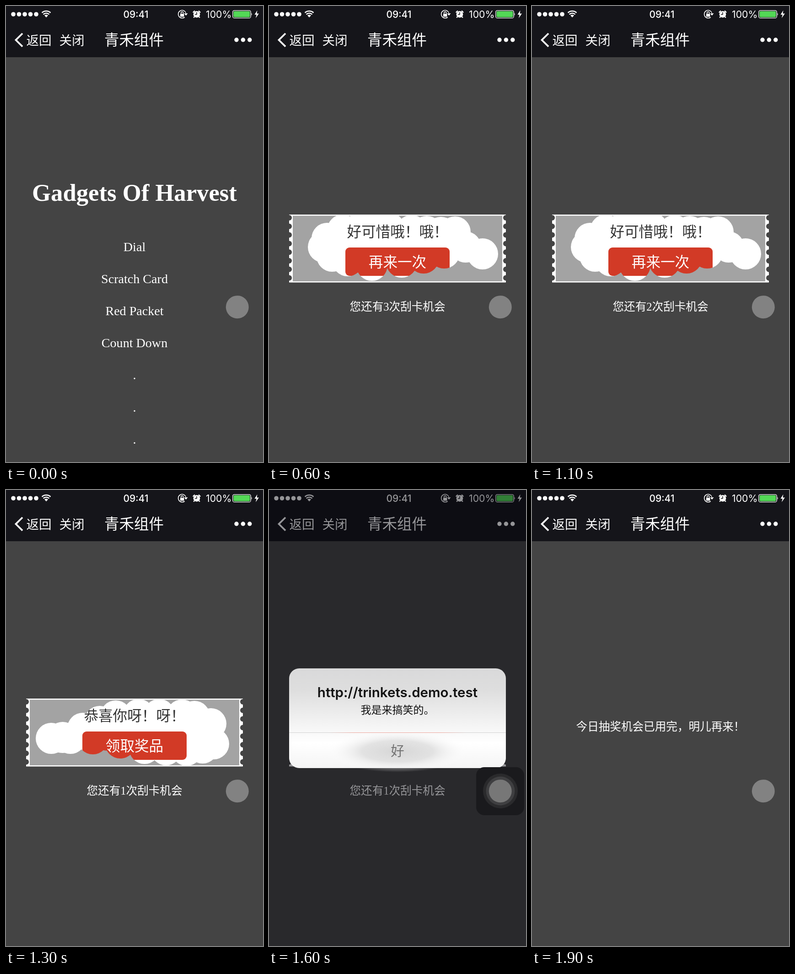
Recreate the animation shown at these times as an HTML page. Size 562 by 997 pixels, loop 2 s.

```html
<!DOCTYPE html>
<html lang="zh-CN">
<head>
<meta charset="utf-8">
<style>
html, body { margin: 0; width: 100%; height: 100%; overflow: hidden; background: #444; }
svg { display: block; width: 100vw; height: 100vh; }
text { fill: #fff; font-family: "Liberation Serif", "Noto Sans CJK SC", "Noto Sans CJK", serif; }
.ui { font-family: Inter, "Noto Sans CJK SC", "Noto Sans CJK", sans-serif; }
.mid { text-anchor: middle; }
.line { fill: none; stroke: #fff; }
</style>
</head>
<body>
<svg viewBox="0 0 562 997" preserveAspectRatio="none">
  <defs>
    <mask id="scratch" maskUnits="userSpaceOnUse" x="0" y="400" width="562" height="260">
      <rect y="400" width="562" height="260" fill="#fff"/>
      <path id="rubbed" fill="none" stroke="#000" stroke-width="68" stroke-linecap="round"/>
    </mask>
    <linearGradient id="glass" x2="0" y2="1">
      <stop stop-color="#d9d9da"/><stop offset=".22" stop-color="#dedede"/>
      <stop offset=".55" stop-color="#f3f3f3"/><stop offset=".75" stop-color="#fff"/>
      <stop offset="1" stop-color="#f4f4f4"/>
    </linearGradient>
    <radialGradient id="shade">
      <stop stop-color="#d6d6d6"/><stop offset=".5" stop-color="#dcdcdc" stop-opacity=".8"/>
      <stop offset="1" stop-color="#fff" stop-opacity="0"/>
    </radialGradient>
    <linearGradient id="divider">
      <stop offset=".18" stop-color="#d2d2d2"/><stop offset=".3" stop-color="#eda79d"/>
      <stop offset=".7" stop-color="#eda79d"/><stop offset=".82" stop-color="#d2d2d2"/>
    </linearGradient>
    <filter id="soft"><feGaussianBlur stdDeviation=".9"/></filter>
  </defs>

  <rect width="562" height="997" fill="#444"/>

  <g id="home" class="mid">
    <text x="281" y="426" font-size="52.7" font-weight="700">Gadgets Of Harvest</text>
    <g id="menu" font-size="28.1"></g>
  </g>

  <g id="card">
    <rect x="44" y="456" width="474" height="148.5" fill="#fff"/>
    <g id="notches" fill="#444"></g>
    <text id="message" class="mid" x="281" y="505" font-size="31.6" style="fill:#333"></text>
    <rect x="167" y="528" width="228" height="62" rx="9" fill="#d23a26"/>
    <text id="action" class="mid" x="281" y="571" font-size="31.6"></text>
    <g mask="url(#scratch)">
      <rect x="52" y="458.5" width="458" height="143.5" fill="#a3a3a3"/>
      <text class="ui mid" x="281" y="546" font-size="52" font-weight="700" style="fill:#595959" filter="url(#soft)">刮一刮</text>
    </g>
    <text id="chances" class="mid" x="281" y="666" font-size="24.6"></text>
  </g>

  <text id="finished" class="mid" x="281" y="525.5" font-size="24.6">今日抽奖机会已用完，明儿再来！</text>

  <rect width="562" height="112" fill="#15151a"/>
  <g fill="#fff">
    <g id="signal"></g>
    <path d="M88 25l-4-4.4a6 6 0 0 1 8 0z"/>
    <path class="line" stroke-width="2.6" d="M81.6 18.4a9.2 9.2 0 0 1 12.8 0M78.6 14.7a13.6 13.6 0 0 1 18.8 0"/>
    <text class="ui mid" x="284" y="25.7" font-size="21" font-weight="500">09:41</text>

    <path class="line" stroke-width="1.7" d="M393.3 15a8.6 8.6 0 1 0-2.6 9.5"/>
    <path d="M389.5 16h8l-4 5z"/>
    <rect x="381" y="17" width="8.4" height="6.4" rx="1"/>
    <path class="line" stroke-width="1.5" d="M382.8 17v-2a2.4 2.4 0 0 1 4.8 0v2"/>

    <circle cx="417" cy="18.2" r="7.3"/>
    <path class="line" stroke-width="2.4" d="M409 14.5a9 9 0 0 1 4-4M425 14.5a9 9 0 0 0-4-4M412 23.5l-1.8 2M422 23.5l1.8 2"/>
    <path class="line" stroke-width="1.5" style="stroke:#15151a" d="M417 13.5v5h-4"/>

    <text class="ui" x="437" y="25.8" font-size="21.3">100%</text>
    <rect class="line" x="495.8" y="9.8" width="39.4" height="16.6" rx="3.5" stroke-width="1.3"/>
    <rect x="497.6" y="11.6" width="35.8" height="13" rx="2" fill="#53d856"/>
    <path d="M536.6 15q2.4 3 0 6zM549.5 9.5l-6 9.5h4.3l-1.8 7.5 7-10h-4.5z"/>

    <path class="line" stroke-width="3.8" d="M36 60L21.5 74.3 36 88.6"/>
    <g class="ui" font-size="27.5">
      <text class="ui" x="44.5" y="84.5">返回</text>
      <text class="ui" x="116.5" y="84.5">关闭</text>
    </g>
    <text class="ui mid" x="280" y="86" font-size="32.5" font-weight="500">青禾组件</text>
    <g id="more"></g>
  </g>

  <g id="alert">
    <rect width="562" height="997" fill="#04040a" opacity=".42"/>
    <rect x="44" y="390" width="474" height="218" rx="22" fill="url(#glass)"/>
    <ellipse cx="281" cy="571" rx="155" ry="46" fill="url(#shade)"/>
    <path d="M44 530h474v1H44z" fill="url(#divider)"/>
    <g class="mid">
      <text class="ui" x="281" y="453" font-size="29.5" font-weight="600" style="fill:#111">http://trinkets.demo.test</text>
      <text class="ui" x="281" y="489" font-size="23" style="fill:#111">我是来搞笑的。</text>
      <text class="ui" x="281" y="580.5" font-size="29.5" style="fill:#747474">好</text>
    </g>
    <rect x="453" y="606" width="105" height="105" rx="18" fill="#1a1a1d"/>
    <circle cx="506" cy="658" r="38" fill="#2a2a2c"/>
    <circle cx="506" cy="658" r="31.5" fill="#3f3f41"/>
  </g>
  <circle id="touch" cx="505.8" cy="658.2" r="25"/>
</svg>
<script>
const $ = id => document.getElementById(id);
const repeat = (n, make) => Array.from({ length: n }, (_, i) => make(i)).join('');
const circle = (x, y, r) => `<circle cx="${x}" cy="${y}" r="${r}"/>`;

$('signal').innerHTML = repeat(5, i => circle(16 + 12.5 * i, 18, 4.8));
$('more').innerHTML = repeat(3, i => circle(504 + 14.4 * i, 74, 4.7));
$('notches').innerHTML = repeat(8, i => circle(44, 463 + 18.8 * i, 6) + circle(518, 463 + 18.8 * i, 6));
const items = ['Dial', 'Scratch Card', 'Red Packet', 'Count Down', '.', '.', '.'];
$('menu').innerHTML = repeat(7, i => `<text x="281" y="${535.5 + 70.2 * i}">${items[i]}</text>`);

// Finger positions, in the order they are rubbed
const loseRub = [
  [119, 527], [127, 508], [138, 547], [161, 490], [172, 557], [165, 525], [200, 485],
  [200, 525], [225, 567], [235, 485], [250, 525], [263, 486], [290, 560], [300, 525],
  [312, 491], [338, 551], [345, 493], [350, 522], [376, 495], [383, 540], [407, 494],
  [430, 527], [467, 542]
];
const winRub = [
  [99, 543], [124, 541], [141, 543], [168, 521], [190, 544], [205, 506], [222, 536],
  [240, 494], [250, 553], [270, 525], [290, 491], [303, 565], [320, 528], [335, 491],
  [350, 568], [370, 528], [385, 492], [395, 569], [412, 495], [420, 528], [430, 564],
  [448, 511], [454, 555]
];
const lose = { message: '好可惜哦！哦！', action: '再来一次', rub: loseRub };
const win = { message: '恭喜你呀！呀！', action: '领取奖品', rub: winRub };

function drawCard(chances, result, progress) {
  $('chances').textContent = `您还有${chances}次刮卡机会`;
  $('message').textContent = result.message;
  $('action').textContent = result.action;
  const rubbed = result.rub.slice(0, Math.round(result.rub.length * progress));
  $('rubbed').setAttribute('d', rubbed.map(([x, y]) => `M${x} ${y}h.01`).join(''));
}

const show = (id, on) => $(id).style.display = on ? '' : 'none';
const rubProgress = (step, start) => Math.max(0, Math.min(1, (step - start) / 2));

function draw(step) {
  const alerting = step >= 15 && step < 18;
  show('home', step < 4);
  show('card', step >= 4 && step < 19);
  show('finished', step === 19);
  show('alert', alerting);
  $('touch').setAttribute('fill', alerting ? '#777' : '#828282');
  $('home').setAttribute('transform', `translate(0 ${-3.5 * Math.min(1, step / 3)})`);

  if (step < 8) drawCard(3, lose, rubProgress(step, 4));
  else if (step < 12) drawCard(2, lose, rubProgress(step, 9));
  else drawCard(1, win, rubProgress(step, 11));
}

let lastStep = -1;
function tick() {
  const step = Math.floor(performance.now() % 2000 / 100);
  if (step !== lastStep) draw(lastStep = step);
  requestAnimationFrame(tick);
}
tick();
</script>
</body>
</html>
```
